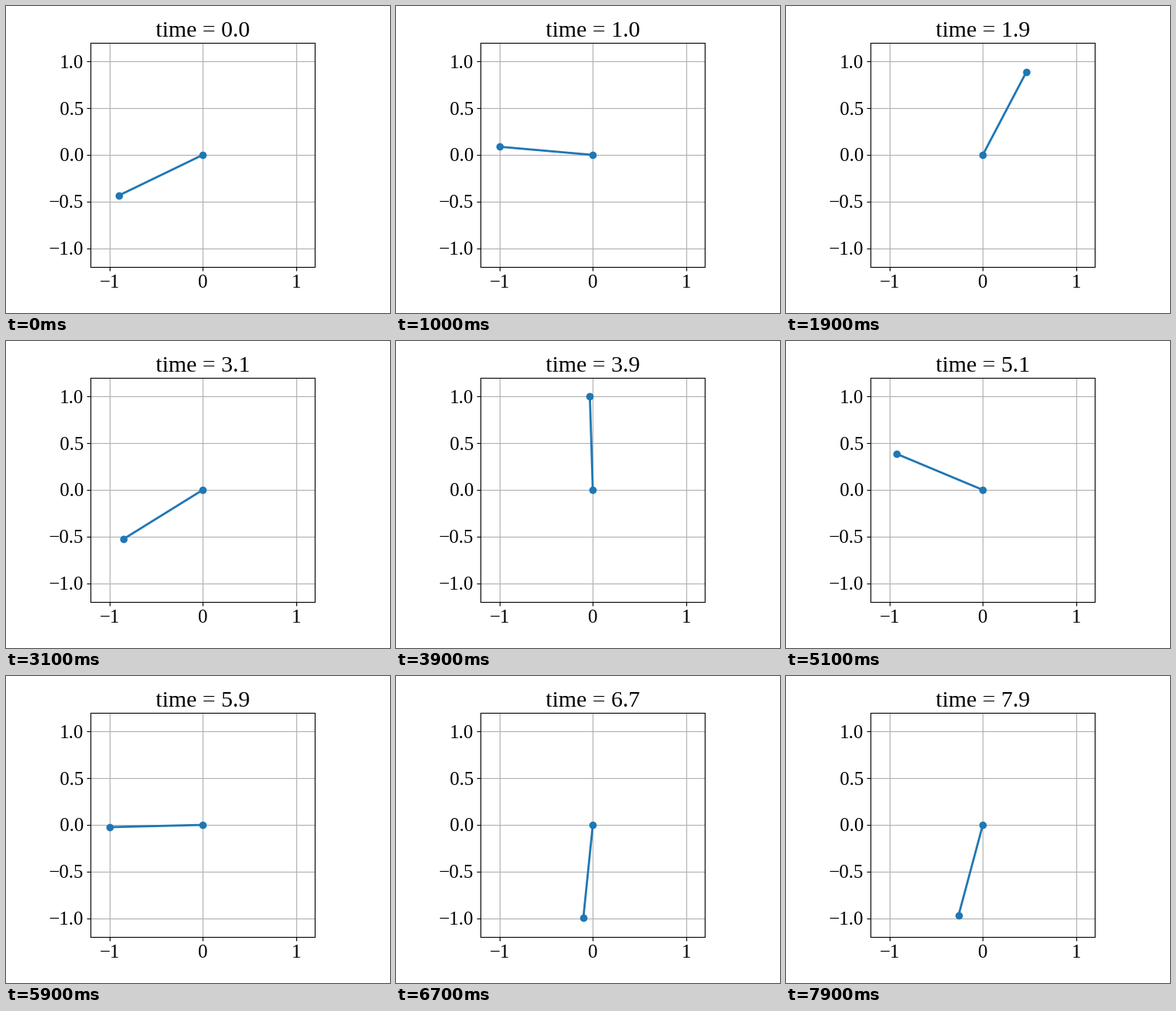
Recreate the animation shown at these times as a matplotlib script. Size 500 by 400 pixels, loop 8 s.

```python
import numpy as np
import matplotlib.pyplot as plt
from matplotlib.animation import FuncAnimation

plt.rcParams["font.family"] = "Liberation Serif"
plt.rcParams["font.size"] = 18

FRAMES = 80
DT = 0.1
SUB = 2          # solver steps per frame
GRAVITY = 9.8

# Key poses: time in s -> arm angle in degrees from +x, counter-clockwise
POSES = {0: 205.8, 0.5: 130, 1: 175, 1.3: 263, 1.9: 422.3, 2.7: 490.5,
         3.1: 571.8, 3.9: 811.8, 4.5: 1010, 5.1: 1237.3, 5.9: 1621.4,
         6.7: 2064.2, 7.5: 2542.8, 7.9: 2775}


def swing(poses):
    """Pendulum motion through the poses that needs the least driving torque."""
    h = DT / SUB
    n = (FRAMES - 1) * SUB + 1
    times = np.array(list(poses))
    phi = np.interp(np.arange(n) * h, times, np.radians(list(poses.values())))
    free = np.setdiff1d(np.arange(n), np.rint(times / h).astype(int))
    eye = np.eye(n)
    accel = np.diff(eye, 2, axis=0) / h**2

    # Gauss-Newton, with gravity faded in so that the path bends gradually
    for step in range(45):
        g = GRAVITY * min(step / 30, 1)
        torque = accel @ phi + g * np.cos(phi[1:-1])
        jac = accel - g * np.sin(phi[1:-1, None]) * eye[1:-1]
        phi[free] -= np.linalg.lstsq(jac[:, free], torque, rcond=None)[0]
    return phi[::SUB]


angles = swing(POSES)

fig = plt.figure(figsize=(5, 4), dpi=100)
ax = fig.add_axes([110.25 / 500, 0.15, 292 / 500, 0.73])
ax.set(xlim=(-1.2, 1.2), ylim=(-1.2, 1.2),
       xticks=[-1, 0, 1], yticks=[-1, -0.5, 0, 0.5, 1])
ax.tick_params(axis="x", pad=4)
ax.tick_params(axis="y", pad=3)
ax.grid()
arm, = ax.plot([], [], "o-", lw=2)
title = ax.set_title("")


def update(i):
    phi = angles[i]
    arm.set_data([0, np.cos(phi)], [0, np.sin(phi)])
    title.set_text(f"time = {i * DT:.1f}")
    return arm, title


anim = FuncAnimation(fig, update, frames=FRAMES, interval=1000 * DT,
                     repeat=True, repeat_delay=0)
plt.show()
```
